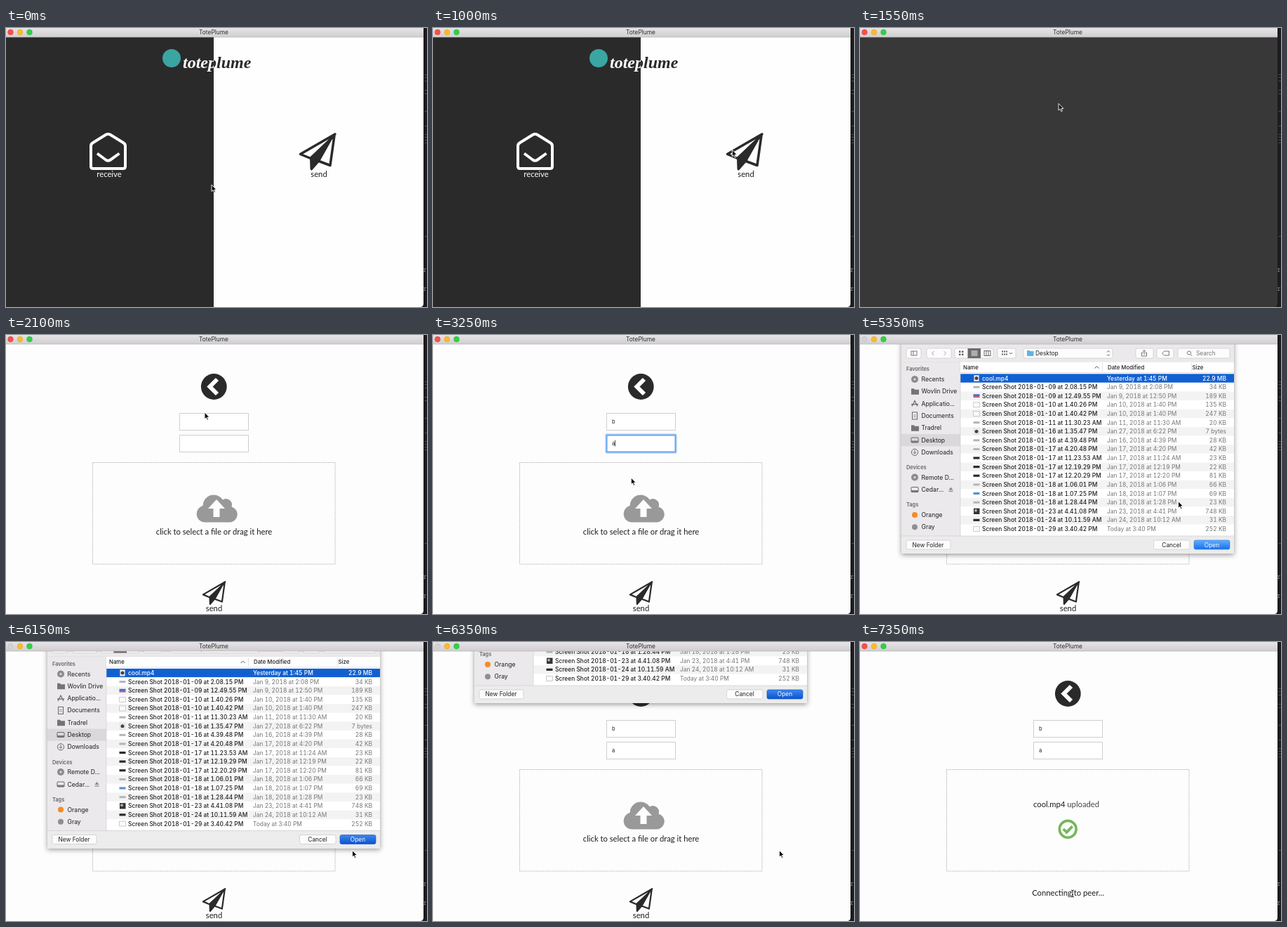
Write an HTML page that moves like this. It is 600 px wide and 397 px high and loops after 8000 ms.

```html
<!DOCTYPE html>
<html lang="en">
<head>
<meta charset="utf-8">
<title>TotePlume</title>
<style>
html, body { margin: 0; width: 100%; height: 100%; overflow: hidden; background: #1d1b1d; }
svg { display: block; width: 100%; height: 100%; }
text { font-family: Inter, Roboto, sans-serif; font-size: 8.4px; font-variant-numeric: tabular-nums; fill: #1f1f1f; white-space: pre; }
.page { font-family: Lato, "Open Sans", sans-serif; font-size: 11.25px; fill: #1d1c1d; }
.logo { font: italic bold 24px "Liberation Serif", serif; }
.mid { text-anchor: middle; }
.end { text-anchor: end; }
.name { font-weight: 500; }
.side { font-size: 8.6px; }
.dim { fill: #757575; }
.head { font-size: 7.4px; font-weight: 600; fill: #666466; }
.col { font-size: 7.8px; font-weight: 500; }
.shell { font-family: "Noto Sans Mono", monospace; font-size: 8px; fill: #8d8d8d; }
</style>
</head>
<body>
<script>
const LOOP = 8000, INK = '#2b2a2b';

const text = (x, y, s, cls = '', more = '') => `<text x="${x}" y="${y}" class="${cls}" ${more}>${s}</text>`;
const rect = (x, y, w, h, fill, more = '') => `<rect x="${x}" y="${y}" width="${w}" height="${h}" fill="${fill}" ${more}/>`;
const dot = (x, y, r, fill, more = '') => `<circle cx="${x}" cy="${y}" r="${r}" fill="${fill}" ${more}/>`;
const line = (d, color, w = 1, more = '') => `<path d="${d}" fill="none" stroke="${color}" stroke-width="${w}" ${more}/>`;
const fill = (d, color) => `<path d="${d}" fill="${color}"/>`;
const group = (id, body, more = '') => `<g id="${id}" ${more}>${body}</g>`;
const round = 'stroke-linejoin="round" stroke-linecap="round"';

const plane =
  line('M469 151L419.500 179.500L434 185.500L468 153L462 195.500L446 189.500', INK, 3.5, round) +
  fill('M433 184L469 151L447 190L436 202.500Q433.500 203 433.500 200Z', INK);

// Start page
const home = rect(0, 13, 296, 384, INK) + rect(296, 13, 299, 384, '#fefefe') +
  dot(236, 43, 13, '#3aa5a1') +
  text(252, 57, 'toteplume', 'logo', 'style="fill:#fff" clip-path="url(#leftHalf)"') +
  text(252, 57, 'toteplume', 'logo', `style="fill:${INK}" clip-path="url(#rightHalf)"`) +
  line('M121 168Q121 165 123.500 163.500L142 152Q145.500 150 149 152L167.500 163.500Q170 165 170 168V197Q170 200 167 200H124Q121 200 121 197Z', '#fff', 4, round) +
  line('M130 178.500L142 187.500Q145.500 190 149 187.500L161.500 178.500', '#fff', 4) +
  text(147, 212, 'receive', 'page mid', 'style="fill:#fff"') +
  plane + text(446, 212, 'send', 'page mid');

// Form page
const field = y => rect(247.5, y, 98, 24, '#fff', 'stroke="#cfcdcf"');
const ring = (id, y) => group(id, rect(247, y - .5, 99, 25, 'none', 'rx="1" stroke="#b5d5fa" stroke-width="3.5"') +
  rect(247.5, y, 98, 24, 'none', 'stroke="#5d9df0" stroke-width="1.4"'));
const caret = (id, y) => group(id, rect(0, y, .8, 9, '#222'));

const cloud = fill('M285 266.500A12 12 0 0 1 280.500 243A15.500 15.500 0 0 1 309 234.500A8.500 8.500 0 0 1 321.500 244.500A11.200 11.200 0 0 1 319 266.500Z', '#999') +
  fill('M300 234L312 247H304.500V259H295.500V247H288Z', '#fdfdfe');

const form =
  dot(296.3, 73.5, 18.4, INK) + line('M301 63L290.500 73.500L301 84', '#fff', 6) +
  field(111.5) + field(142.5) + ring('ring1', 111.5) + ring('ring2', 142.5) +
  caret('caret1', 118.5) + caret('caret2', 149.5) +
  text(255, 126, 'b', '', 'id="typeB" style="font-size:7.5px"') +
  text(255, 157, 'a', '', 'id="typeA" style="font-size:7.5px"') +
  rect(123.5, 181.5, 345.5, 144.5, 'none', 'stroke="#a9a9a9" stroke-dasharray="1.3 1.3"') +
  group('pick', cloud + text(296.5, 284, 'click to select a file or drag it here', 'page mid')) +
  group('done', text(247, 235, 'cool.mp4 <tspan fill="#444">uploaded</tspan>', 'page') +
    dot(296.2, 266.3, 11.9, 'none', 'stroke="#76b65c" stroke-width="3.6"') +
    line('M289.700 266L294.500 270.700L302.700 262.300', '#76b65c', 3.8)) +
  group('send', `<g transform="translate(14.5 255.4) scale(.635)">${plane}</g>` + text(296.5, 393, 'send', 'page mid')) +
  text(296.5, 361, 'Connecting to peer...', 'page mid', 'id="connect"');

// Open-file sheet
const files = `cool.mp4|Yesterday at 1:45 PM|22.9 MB|m
09 at 2.08.15 PM|Jan 9, 2018 at 2:08 PM|34 KB|g
09 at 12.49.55 PM|Jan 9, 2018 at 12:50 PM|189 KB|r
10 at 1.40.26 PM|Jan 10, 2018 at 1:40 PM|135 KB|w
10 at 1.40.42 PM|Jan 10, 2018 at 1:40 PM|247 KB|w
11 at 11.30.23 AM|Jan 11, 2018 at 11:30 AM|20 KB|g
16 at 1.35.47 PM|Jan 27, 2018 at 6:22 PM|7 bytes|m
16 at 4.39.48 PM|Jan 16, 2018 at 4:39 PM|28 KB|g
17 at 4.20.48 PM|Jan 17, 2018 at 4:20 PM|42 KB|g
17 at 11.23.53 AM|Jan 17, 2018 at 11:24 AM|23 KB|k
17 at 12.19.29 PM|Jan 17, 2018 at 12:19 PM|22 KB|k
17 at 12.20.29 PM|Jan 17, 2018 at 12:20 PM|81 KB|k
18 at 1.06.01 PM|Jan 18, 2018 at 1:06 PM|66 KB|g
18 at 1.07.25 PM|Jan 18, 2018 at 1:07 PM|69 KB|b
18 at 1.28.44 PM|Jan 18, 2018 at 1:28 PM|23 KB|g
23 at 4.41.08 PM|Jan 23, 2018 at 4:41 PM|748 KB|p
24 at 10.11.59 AM|Jan 24, 2018 at 10:12 AM|31 KB|k
29 at 3.40.42 PM|Today at 3:40 PM|252 KB|w`.split('\n').map(s => s.split('|'));

const thumbs = {
  g: y => rect(161.5, y - 1.5, 9, 3, '#b5b5b5'),
  k: y => rect(161.5, y - 1.7, 9, 3.2, '#2c2c2c'),
  b: y => rect(161.5, y - 1.7, 9, 3.2, '#5b8fd6'),
  r: y => rect(161.5, y - 2.5, 9, 3, '#3b6fd0') + rect(161.5, y + .5, 9, 1.8, '#d4504e'),
  w: y => rect(161.7, y - 3.5, 8.6, 7, '#fafafa', 'stroke="#aaa" stroke-width=".6"'),
  m: y => rect(162.5, y - 4.3, 7, 8.6, '#f4f4f4', 'stroke="#bbb" stroke-width=".4"') + dot(166, y, 2.5, '#444'),
  p: y => rect(162, y - 4.2, 8.5, 8.4, '#333') + dot(165, y - 1, 2, '#aaa')
};

function row([name, date, size, kind], i) {
  const y = 61.5 + i * 12.62, base = y + 3;
  const full = i ? 'Screen Shot 2018-01-' + name : name;
  const bg = i % 2 ? '#fff' : '#f3f3f4';
  const cells = c => text(174, base, full, 'name', c) + text(352, base, date, 'dim', c) + text(522, base, size, 'end dim', c);
  return rect(143, y - 6.31, 390, 12.62, bg) + cells('') +
    (i ? '' : group('picked', rect(143, y - 6.31, 390, 12.62, '#1160d2') + cells('style="fill:#fff;font-weight:500"'))) +
    thumbs[kind](y);
}

const glyph = (y, kind) => ({
  box: rect(73, y - 3.5, 10, 7, 'none', 'rx="1" stroke="#666"') + rect(73, y + 1, 10, 2.5, '#777'),
  disc: dot(78, y, 5, '#8c8c8c') + dot(78, y, 1.6, '#ddd'),
  page: rect(74.5, y - 5, 7, 10, '#eee', 'stroke="#666"') + line(`M76 ${y - 1}h4m-4 2.500h4`, '#777', .8),
  folder: fill(`M73 ${y - 4}h4l1 1.500h6v7h-11z`, '#757375'),
  app: line(`M74 ${y + 4}L78 ${y - 4}L82 ${y + 4}M73 ${y + 1}h10`, '#666', 1.2),
  down: dot(78, y, 4.6, 'none', 'stroke="#666"') + line(`M78 ${y - 3}v5m-2 -2l2 2l2 -2`, '#666'),
  orange: dot(78, y, 4, '#f58a2a'),
  gray: dot(78, y, 4, '#8f8e92')
})[kind];
const item = (y, name, kind) => text(87.5, y + 3, name, 'side') + glyph(y, kind);

const sidebar = rect(59, 38, 84, 248, '#ebe9eb') +
  group('place', rect(59, 141, 84, 17.3, 'currentColor')) +
  text(66, 51, 'Favorites', 'head') +
  [['Recents', 'disc'], ['Wovlin Drive', 'folder'], ['Applicatio...', 'app'], ['Documents', 'page'],
   ['Tradrel', 'folder'], ['Desktop', 'box'], ['Downloads', 'down']]
    .map(([n, k], i) => item(63 + i * 17.3, n, k)).join('') +
  text(66, 191, 'Devices', 'head') + item(202.5, 'Remote D...', 'disc') + item(220, 'Cedar...', 'box') +
  fill('M126.500 220.500L129.500 216.500L132.500 220.500ZM126.500 221.700h6v1.200h-6z', '#888') +
  group('media', text(66, 243.5, 'Media', 'head') + item(255, 'Music', 'disc') + item(272, 'Photos', 'page') + glyph(288, 'box')) +
  group('tags', text(66, 244, 'Tags', 'head') + item(256, 'Orange', 'orange') + item(273.3, 'Gray', 'gray'));

const pill = (x, w, y = 19, h = 14, c = '#fcfcfc', more = '') => rect(x, y, w, h, c, `rx="2.5" stroke="#c9c7c9" stroke-width=".7" ${more}`);
const toolbar = rect(59, 13, 474, 25, '#ebe9eb') +
  pill(66, 21) + rect(73, 23, 8, 6, 'none', 'stroke="#777"') + line('M76 23v6', '#777') +
  pill(95, 35) + line('M105.500 23l-3 3l3 3', '#999') + line('M119.500 23l3 3l-3 3', '#aaa') +
  pill(135, 55) + rect(153.5, 19, 18.5, 14, '#6c6a6c') +
  [0, 4].map(d => rect(141 + d, 22.5, 2.5, 2.5, '#666') + rect(141 + d, 26.5, 2.5, 2.5, '#666')).join('') +
  line('M158.500 23h9m-9 2h9m-9 2h9m-9 2h9', '#fff', .9) +
  rect(177, 22.5, 9, 7, 'none', 'stroke="#666"') + line('M180 22.500v7m3 -7v7', '#666') +
  pill(196, 26) + line('M202 23.500h8m-8 4h8', '#666', 2, 'stroke-dasharray="2 1"') + line('M213 25l2 2l2 -2', '#666') +
  pill(233, 127) + fill('M238 22h3.500l1 1h5v7h-9.500z', '#5db4e8') + text(250, 29, 'Desktop') +
  line('M352 24.500l2 -2l2 2m-4 3l2 2l2 -2', '#555') +
  pill(393, 25) + line('M403.500 25h-2v5h7v-5h-2M405 28v-6.500m-2 2l2 -2l2 2', '#666', .9) +
  pill(423, 24) + line('M440 23h-6.500l-3 3l3 3h6.500z', '#666', .9, round) +
  pill(453, 74) + dot(469, 25.5, 2.6, 'none', 'stroke="#777"') + line('M471 27.500l2.500 2.500', '#777') +
  text(479, 29, 'Search', 'dim');

const header = rect(143, 38, 390, 17.2, '#fff') + line('M59 38h474M143 53.500h390', '#d2d0d2', .7) +
  line('M345.500 40v12M472.500 40v12', '#d5d5d5', .7) + line('M334.500 47.500l3 -3l3 3', '#555') +
  text(147, 48.7, 'Name', 'col') + text(353, 48.7, 'Date Modified', 'col') + text(473.5, 48.7, 'Size', 'col');

const openBtn = (id, bg, edge, ink) => group(id,
  rect(476, 292, 51, 13, bg, `rx="2.500" stroke="${edge}" stroke-width=".7"`) + text(501.5, 301.5, 'Open', 'mid', `style="fill:${ink}"`));
const footer = rect(59, 286, 474, 25, '#ececec') + line('M59 286h474', '#d0ced0', .7) +
  pill(66, 63, 292, 13) + text(97, 301.5, 'New Folder', 'mid') +
  pill(418.5, 51.5, 292, 13) + text(444, 301.5, 'Cancel', 'mid') +
  openBtn('openOff', '#f3f3f3', '#d3d3d3', '#b3b3b3') +
  openBtn('openOn', 'url(#blue)', '#3b86e6', '#fff') +
  openBtn('openDown', 'url(#deep)', '#1c59c0', '#fff');

const sheet = rect(59, -20, 474, 331, '#ececec', 'filter="url(#shadow)"') +
  `<g clip-path="url(#listArea)">${rect(143, 38, 390, 248, '#fff')}${files.map(row).join('')}${sidebar}</g>` +
  line('M143 38v248', '#d0ced0', .7) + header + toolbar + footer;

// Window frame and the strip of terminal behind it
const light = (x, c, edge) => dot(x, 6, 3.9, c, `stroke="${edge}" stroke-width=".5"`);
const titleBar = rect(0, 0, 595, 13, 'url(#bar)') + line('M0 13h595', '#b5b3b5', .7) +
  group('closeOn', light(6.5, '#f6504c', '#dd413d')) + group('closeOff', light(6.5, '#d3d1d3', '#bfbdbf')) +
  light(20, '#f9bc2d', '#dea123') + light(33.5, '#33d047', '#27b139') +
  text(296, 9.3, 'TotePlume', 'mid', 'style="fill:#2f2e2f"');
const strip = rect(595, 0, 5, 397, '#1d1b1d') +
  [66, 70, 75, 88, 93, 118, 139, 151, 155, 159, 163, 296].map(y => rect(596.5, y, 4, .8, '#5d5b5d')).join('') +
  text(594.5, 346.5, 'rs', 'shell') + text(594.5, 373.5, 'r1', 'shell') +
  fill('M595 392v5h-5q5 0 5 -5z', '#1d1b1d');

const grad = (id, a, b) => `<linearGradient id="${id}" x2="0" y2="1"><stop stop-color="${a}"/><stop offset="1" stop-color="${b}"/></linearGradient>`;
const clip = (id, x, y, w, h) => `<clipPath id="${id}">${rect(x, y, w, h, '#000')}</clipPath>`;

document.body.innerHTML = `<svg viewBox="0 0 600 397" preserveAspectRatio="none"><defs>
  ${grad('bar', '#e6e4e6', '#d0ced0')}${grad('blue', '#64acf9', '#1771ee')}${grad('deep', '#3d88ec', '#0c52d0')}
  ${clip('leftHalf', 0, 0, 296, 100)}${clip('rightHalf', 296, 0, 300, 100)}
  ${clip('below', 0, 13, 595, 384)}${clip('listArea', 59, 38, 474, 248)}
  <filter id="shadow" x="-10%" y="-10%" width="120%" height="120%"><feDropShadow dx="0" dy="2" stdDeviation="3.5" flood-opacity=".4"/></filter>
  </defs>${rect(0, 0, 595, 397, INK)}${group('home', home)}
  ${group('paper', rect(0, 13, 595, 384, '#fdfdfe'))}${group('form', form)}
  <g clip-path="url(#below)">${group('sheet', sheet)}</g>${titleBar}${strip}
  ${group('arrow', '<path d="M0 0V9.600L2.200 7.600L3.800 11.200L5.400 10.500L3.900 7H6.900Z" fill="#0b0b0b" stroke="#fff" stroke-width=".9"/>')}
  ${group('beam', line('M-2 -5Q0 -5 0 -3.500Q0 -5 2 -5M0 -4V4M-2 5Q0 5 0 3.500Q0 5 2 5M-1 1.500h2', '#222', 1))}</svg>`;

// Pointer path: time, x, y
const path = [
  [0, 293, 223], [50, 293, 223], [150, 300, 188], [350, 300, 188], [750, 400, 172], [1150, 442, 174], [1250, 442, 174],
  [1550, 283, 107.5], [2100, 283, 110], [2250, 284, 123], [2950, 284, 128], [3250, 282.3, 203], [3500, 290, 233],
  [3950, 290, 233], [4200, 233, 139], [4750, 212, 66], [4850, 209, 63], [5080, 209, 63], [5350, 453.5, 236.5],
  [5700, 493.5, 296.5], [6400, 493.5, 296.5], [6670, 316, 270], [7050, 303, 358], [8000, 303, 358]
];

const el = {};
document.querySelectorAll('[id]').forEach(n => el[n.id] = n);
const show = (id, on) => el[id].style.display = on ? '' : 'none';
const part = (t, a, b) => Math.min(1, Math.max(0, (t - a) / (b - a)));
const smooth = p => p * p * (3 - 2 * p);
const within = (t, a, b) => t >= a && t < b;

function pointer(t) {
  const i = path.findIndex(p => p[0] > t);
  const [a, x, y] = path[i - 1], [b, u, v] = path[i];
  const p = part(t, a, b);
  return [x + (u - x) * p, y + (v - y) * p];
}

function draw(t) {
  el.home.setAttribute('opacity', 1 - part(t, 1250, 1500));
  el.paper.setAttribute('opacity', part(t, 1475, 2050) ** 1.33);
  el.form.setAttribute('opacity', part(t, 1560, 2050));
  show('home', t < 1500);

  show('ring1', within(t, 2250, 2750));
  show('ring2', within(t, 2750, 3450));
  show('caret1', within(t, 2250, 2750));
  show('caret2', within(t, 2750, 3450));
  el.caret1.setAttribute('transform', `translate(${t < 2500 ? 255 : 259.6} 0)`);
  el.caret2.setAttribute('transform', `translate(${t < 3050 ? 255 : 259.2} 0)`);
  show('typeB', t >= 2500);
  show('typeA', t >= 3050);

  const down = smooth(part(t, 3950, 4311)), up = part(t, 6100, 6400) ** 1.6;
  const open = within(t, 3950, 6400);
  show('sheet', open);
  el.sheet.setAttribute('transform', `translate(0 ${-298 * (1 - down + up)})`);
  show('closeOn', !open);
  show('closeOff', open);
  show('media', t < 4400);
  show('tags', t >= 4400);
  show('picked', t >= 5050);
  el.place.style.color = t < 5050 ? '#c9c7c9' : '#dad8da';
  show('openOff', t < 5050);
  show('openOn', within(t, 5050, 5800));
  show('openDown', t >= 5800);

  show('pick', t < 6450);
  show('done', t >= 6450);
  show('send', t < 7250);
  show('connect', t >= 7250);

  const [x, y] = pointer(t);
  const beam = within(t, 2150, 3050) || t >= 7300;
  show('arrow', !beam);
  show('beam', beam);
  el[beam ? 'beam' : 'arrow'].setAttribute('transform', `translate(${x} ${y})`);
}

function tick() {
  draw(performance.now() % LOOP);
  requestAnimationFrame(tick);
}
tick();
</script>
</body>
</html>
```
